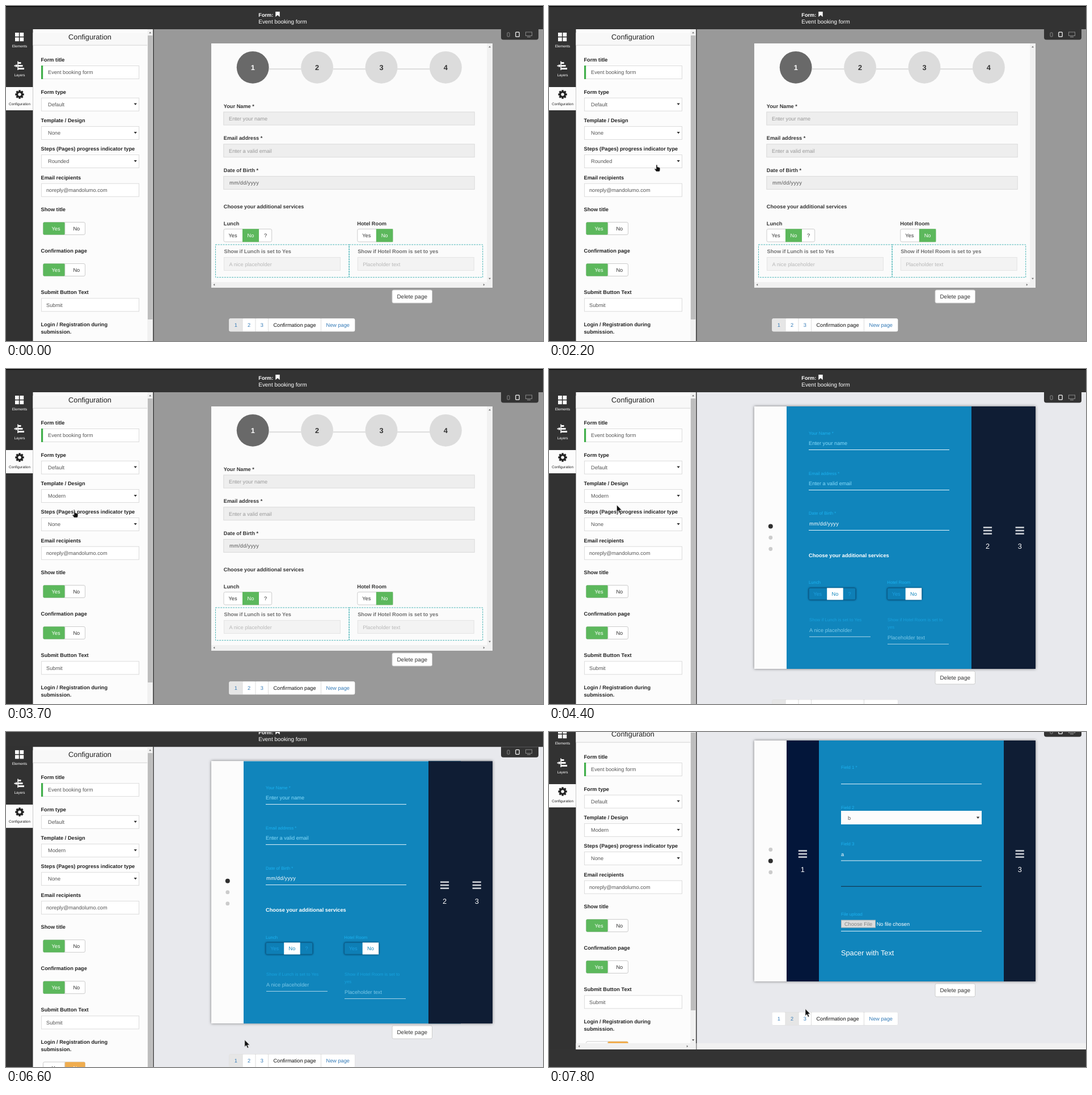
An HTML page for the animation above (8000 ms loop, 947 by 591 pixels).

```html
<!DOCTYPE html>
<html lang="en">
<head>
<meta charset="utf-8">
<title>Form builder</title>
<style>
  html, body { margin: 0; width: 100%; height: 100%; overflow: hidden; background: #333; }
  svg { display: block; }
  body > svg { width: 100vw; height: 100vh; }
  text { font-family: "Liberation Sans", Arial, sans-serif; text-rendering: geometricPrecision; }
  .card { filter: drop-shadow(0 0 2.5px rgba(0, 0, 0, .5)); }
  .glow { filter: drop-shadow(0 0 1.8px rgba(0, 20, 50, .75)); }
</style>
</head>
<body>
<svg id="stage" viewBox="0 0 947 591" xmlns="http://www.w3.org/2000/svg"></svg>
<script>
const LOOP = 8000, S = 9.21, M = 9.92, L = 12.76, XS = 6.38, FIELD = 7.75;
const BLUE = '#1085bc', NAVY = '#0f1d34', LINK = '#337ab7', CYAN = '#1cb2f0', PALE = '#86dcfb';

// Drawing helpers; text is placed by the middle of its capitals.
const rect = (x, y, w, h, fill, more = '') =>
  `<rect x="${x}" y="${y}" width="${w}" height="${h}" fill="${fill}" ${more}/>`;
const box = (x, y, w, h, fill = '#fff', stroke = '#dcdcdc', more = '') =>
  rect(x + .5, y + .5, w - 1, h - 1, fill, `stroke="${stroke}" ${more}`);
const text = (x, cy, str, size = S, fill = '#222', more = '') =>
  `<text x="${x}" y="${(cy + size * .36).toFixed(2)}" font-size="${size}" fill="${fill}" ${more}>${str}</text>`;
const bold = (x, cy, str, fill = '#222', size = S) => text(x, cy, str, size, fill, 'font-weight="700"');
const mid = (x, cy, str, size, fill, more = '') => text(x, cy, str, size, fill, `text-anchor="middle" ${more}`);
const path = (d, fill, more = '') => `<path d="${d}" fill="${fill}" ${more}/>`;
const group = (id, body, more = '') => `<g id="${id}" ${more}>${body}</g>`;
const tri = (x, y, angle, size = 2, fill = '#777') =>
  path('M-1 .6H1L0 -.7Z', fill, `transform="translate(${x} ${y}) rotate(${angle}) scale(${size})"`);
const date = (x, cy, fill) => text(x, cy, 'mm/dd/yyyy', S, fill, 'letter-spacing=".3"');
const rule = (x, y, w, fill = '#e9f6fc') => rect(x, y - .5, w, 1, fill);

// Panel widgets
const select = (y, value, id) => box(62, y, 173, 24) +
  text(74, y + 12, value, S, '#555', id ? `id="${id}"` : '') + tri(228.2, y + 11.5, 180, 2.7, '#333');
const input = (y, value, x = 71) => box(62, y, 173, 24) + text(x, y + 12, value, S, '#555');
const yesNo = (y, yes, no) => box(65, y, 75, 23, '#fff', '#ccc', 'rx="2.5"') +
  (yes ? rect(65.5, y + .5, 38.5, 22, yes, 'rx="2"') : rect(103.5, y + .5, 36, 22, no, 'rx="2"')) +
  rect(103.5, y, .8, 23, '#ccc') +
  mid(88, y + 11.5, 'Yes', S, yes ? '#fff' : '#333') + mid(124.3, y + 11.5, 'No', S, no ? '#fff' : '#333');

function sidebar() {
  const squares = [[16, 47], [24.4, 47], [16, 55.4], [24.4, 55.4]]
    .map(([x, y]) => rect(x, y, 6.8, 6.8, '#fff')).join('');
  const layers = rect(20.2, 97.5, 1.6, 15.5, '#fff') + path('M14.5 104.5h3v-2l3.4 3-3.4 3v-2h-3z', '#fff') +
    rect(21.5, 99, 5, 3, '#fff') + rect(21.5, 104, 8, 3, '#fff') + rect(21.5, 109, 10.5, 3, '#fff');
  let teeth = '';
  for (let a = 0; a < 360; a += 45) teeth += rect(22.3, 148.3, 3.4, 4, '#222', `transform="rotate(${a} 24 156)"`);
  return rect(0, 41, 47.5, 700, '#323232') + squares + mid(24, 71, 'Elements', XS, '#fff') +
    layers + mid(24, 122, 'Layers', XS, '#fff') + rect(0, 143, 47.5, 41, '#fcfcfc') + teeth +
    '<circle cx="24" cy="156" r="4.4" fill="none" stroke="#222" stroke-width="3.4"/>' +
    mid(24, 173, 'Configuration', XS, '#222');
}

function panel() {
  const labels = [[95, 'Form title'], [151.5, 'Form type'], [202, 'Template / Design'],
    [252, 'Steps (Pages) progress indicator type'], [302.5, 'Email recipients'], [359, 'Show title'],
    [432, 'Confirmation page'], [505, 'Submit Button Text'],
    [562, 'Login / Registration during'], [574.7, 'submission.']];
  return rect(47.5, 41, 212, 700, '#fcfcfc') + rect(47.5, 47, 202, 22, '#f8f8f8') + rect(47.5, 68.7, 202, 1, '#d4d4d4') +
    mid(148, 54.6, 'Configuration', L, '#222') +
    labels.map(([y, s]) => bold(61.5, y, s)).join('') +
    input(105, 'Event booking form', 74) + rect(62, 105, 3.2, 24, '#3fae49') +
    select(161.7, 'Default') + select(212, 'None', 'design') + select(262, 'Rounded', 'steps') +
    input(312.7, 'noreply@mandolumo.com') +
    yesNo(381, '#5cb85c') + yesNo(454, '#5cb85c') + input(515.3, 'Submit') + yesNo(596.5, '', '#f0ad4e') +
    rect(249.3, 41, 10, 700, '#f1f1f1') + tri(254.2, 47, 0) +
    '<rect id="thumb" x="250" y="52" width="8.4" fill="#bdbdbd"/>' +
    rect(259.3, 41, 1.3, 700, '#2b2b2b');
}

function header() {
  return rect(0, 0, 947, 41, '#333') + rect(0, 0, 947, 1.4, '#050505') + bold(445.3, 15.5, 'Form:', '#fff') +
    path('M475.3 10h7.4v9.3l-3.7-3.2-3.7 3.2z', '#fff') + text(445.3, 27.3, 'Event booking form', M, '#fff') +
    path('M873 41h66v14.500a4 4 0 0 1-4 4h-58a4 4 0 0 1-4-4z', '#333') +
    rect(884, 47, 4, 7, 'none', 'stroke="#888" rx=".8"') +
    rect(898.8, 46.2, 6.4, 8, 'none', 'stroke="#fff" stroke-width="1.2" rx="1"') +
    rect(916.5, 46, 11, 6.5, 'none', 'stroke="#888"') + rect(919, 54, 6, 1.2, '#888');
}

function classicForm() {
  let s = rect(362, 66, 496, 431, '#fbfbfb') + rect(848, 66, 10, 421, '#f1f1f1') + rect(362, 487, 496, 10, '#f1f1f1') +
    tri(853, 72, 0) + tri(853, 481, 180) + tri(367, 491.7, -90) + tri(843, 491.7, 90);
  for (let i = 0; i < 4; i++) {
    const x = 435.2 + i * 113.4;
    if (i < 3) s += rect(x + 28, 110.2, 58, 2, '#dcdcdc');
    s += `<circle cx="${x}" cy="108.3" r="28.4" fill="${i ? '#dcdcdc' : '#696969'}"/>` +
      mid(x, 108.3, i + 1, L, i ? '#333' : '#fff', 'font-weight="700"');
  }
  ['Your Name *', 'Email address *', 'Date of Birth *'].forEach((name, i) => {
    const y = 176.2 + i * 56.7;
    s += bold(383.8, y, name, '#333') + box(383.3, y + 10.3, 443.4, 24, '#eee', '#dadada') +
      (i < 2 ? text(393, y + 22.5, ['Enter your name', 'Enter a valid email'][i], S, '#999') : date(394, y + 22.5, '#555'));
  });
  const toggle = (x, w, cut, end) => box(x, 393, w, 23.5, '#fff', '#ccc', 'rx="2.500"') +
    rect(x + cut, 393.3, end - cut, 23, '#5cb85c') + mid(x + 16.5, 404.7, 'Yes', S, '#333') +
    mid(x + (cut + end) / 2, 404.7, 'No', S, '#fff');
  s += bold(383.8, 353.3, 'Choose your additional services', '#333') +
    bold(383.8, 383.2, 'Lunch', '#333') + toggle(383.5, 85.7, 33.5, 62.5) + mid(457.5, 404.7, '?', S, '#333') +
    bold(619.3, 383.2, 'Hotel Room', '#333') + toggle(619.3, 63.2, 33.5, 63);
  [['Show if Lunch is set to Yes', 'A nice placeholder'], ['Show if Hotel Room is set to yes', 'Placeholder text']]
    .forEach(([name, hint], i) => {
      const x = 369.5 + i * 235.7;
      s += rect(x, 421, 235.5, 57.7, 'none', 'stroke="#45b3b5" stroke-dasharray="2.8 1.6"') +
        bold(x + 15, 433, name, '#707070') + box(x + 14.5, 443, 206, 24, '#f3f3f3', '#e4e4e4') +
        text(x + 24, 455.3, hint, S, '#b8b8b8');
    });
  return s;
}

const label = (x, y, s) => text(x, y, s, FIELD, CYAN);

// Both pages are drawn relative to their own left edge.
function pageOne() {
  const toggle = (x, w, end) => box(x, 386, w, 21.5, '#0e7fb6', '#0b6390', 'rx="2" class="glow"') +
    rect(x + 32.5, 386.3, end - 32.5, 21, '#fff') + mid(x + 16, 396.7, 'Yes', S, '#1da0e0') +
    mid(x + 16.2 + end / 2, 396.7, 'No', S, BLUE);
  const faded = label(40, 442.3, 'Show if Lunch is set to Yes') + text(40, 460.8, 'A nice placeholder', S, '#b5ecff') +
    rule(40, 472.3, 108, '#fff') + label(178, 442.3, 'Show if Hotel Room is set to') + label(178, 455, 'yes') +
    text(178, 473.4, 'Placeholder text', S, '#b5ecff') + rule(178, 485.3, 108, '#fff');
  return label(39, 113, 'Your Name *') + text(39, 131, 'Enter your name', S, PALE) + rule(39, 142.5, 248) +
    label(39, 184, 'Email address *') + text(39, 202, 'Enter a valid email', S, PALE) + rule(39, 213.5, 248) +
    label(39, 254.7, 'Date of Birth *') + date(40, 273, '#fff') + rule(39, 284.5, 248) +
    bold(39, 328.7, 'Choose your additional services', '#fff') +
    label(39, 376.7, 'Lunch') + toggle(38.7, 83.5, 61) + mid(111, 396.7, '?', S, '#1da0e0') +
    label(177.3, 376.7, 'Hotel Room') + toggle(177.2, 61.5, 61) + `<g opacity=".65">${faded}</g>`;
}

function pageTwo() {
  return label(39, 113, 'Field 1 *') + rule(39, 142.7, 248) + label(39, 184, 'Field 2') +
    rect(39, 190, 248, 24, '#fcfcfc') + text(51, 202.3, 'b', S, '#555') + tri(280.5, 202, 180, 2.7, '#333') +
    label(39, 248.3, 'Field 3') + text(39, 266.3, 'a', S, '#fff') + rule(39, 278, 248) + rule(39, 323.3, 248, '#12293c') +
    label(39, 372.3, 'File upload') + box(39, 382.5, 61, 14, '#dcdcdc', '#b5b5b5') + mid(69.5, 389.5, 'Choose File', S, '#858585') +
    text(101.7, 389.5, 'No file chosen', S, '#fff') + rule(39, 402.3, 248) + text(39, 440.3, 'Spacer with Text', L, '#fff');
}

const strip = (id, n) => group(id, [-5.5, 0, 5.5].map(d => rect(-7.6, d - 13.7, 15.2, 2.6, '#ccd0d6')).join('') +
  mid(0, 15.3, n, L, '#fff'));
const pane = (id, tint, body) => `<svg id="${id}" y="66" height="600">${rect(0, 0, 340, 600, BLUE)}` +
  group(id + 'Shade', rect(0, 0, 340, 600, tint)) + group(id + 'Body', body, 'transform="translate(0 -66)"') + '</svg>';

function modernForm() {
  return '<rect id="card" class="card" x="362" y="66" width="496" fill="#fcfcfc"/>' +
    '<clipPath id="clip"><rect id="clipBox" x="362" y="66" width="496"/></clipPath>' +
    `<g clip-path="url(#clip)">${rect(745, 66, 113, 600, NAVY)}` +
    pane('one', '#03163a', pageOne()) + pane('two', NAVY, pageTwo()) +
    strip('s1', 1) + strip('s2', 2) + strip('s3', 3) + '</g>' +
    [0, 1, 2].map(i => `<circle id="dot${i}" cx="390.8"/>`).join('');
}

function footer() {
  const cells = [[393.5, 23.5, '1'], [417, 23, '2'], [440, 22.5, '3'], [462.5, 93, 'Confirmation page'], [555.5, 59.5, 'New page']];
  return box(680.5, 3.5, 71.5, 24, '#fff', '#ccc', 'rx="2.5"') + mid(716.2, 15.5, 'Delete page', M, '#333') +
    box(393, 54, 222.5, 23.5, '#fff', '#ddd', 'rx="2.5"') +
    cells.map(([x, w, s], i) => rect(x, 54.5, w, 22.5, '#fff', `id="cell${i}" rx="2"`) +
      (i ? rect(x - .5, 54.5, 1, 22.5, '#ddd') : '') +
      mid(x + w / 2, 65.7, s, S, i === 3 ? '#111' : LINK, `id="name${i}"`)).join('');
}

const popup = box(62, 235, 173, 31.5, '#fff', '#a9a9a9') + rect(62.5, 236, 172, 15, '#1e90ff', 'id="pick"') +
  text(74, 243.5, 'None', S, '#fff', 'id="opt0"') + text(74, 258.5, 'Modern', S, '#333', 'id="opt1"');

const bars = rect(47.5, -11, 212, 11, '#f1f1f1') + tri(53, -5.5, -90) + tri(244, -5.5, 90) + tri(254.2, -16.5, 180, 2, '#444') +
  rect(260.6, -11, 687, 11, '#f1f1f1') + rect(0, 0, 947, 300, '#333');

document.getElementById('stage').innerHTML = group('doc',
  '<rect id="back" x="260" y="41" width="687" height="700"/>' + sidebar() + panel() +
  group('classic', classicForm()) + group('modern', modernForm()) + group('foot', footer()) +
  group('bars', bars) + header() + group('popup', popup)) +
  group('cursor',
    path('M0 0V12.300L2.800 9.600 4.800 14.300 6.900 13.400 4.900 8.900H8.800Z', '#111', 'id="arrow" stroke="#eee" stroke-width=".6"') +
    path('M-1 0.500Q0 -.6 1 .5V3.800L5 4.900 5.800 6V9.500L4.800 12H-.8L-4 7.800-3 6.700-1 8Z', '#111', 'id="hand" stroke="#eee" stroke-width=".5"'));

const $ = id => document.getElementById(id);
const set = (id, attrs) => { for (const k in attrs) $(id).setAttribute(k, attrs[k]); };
const show = (id, on) => set(id, { display: on ? 'inline' : 'none' });
const ramp = (t, a, b) => Math.min(1, Math.max(0, (t - a) / (b - a)));
const ease = p => p * p * (3 - 2 * p);
const mix = (a, b, p) => a + (b - a) * p;

// Pointer path: time, x, y
const route = [[200, 936, 572], [500, 690, 470], [800, 320, 345], [1000, 193, 300], [1500, 291, 349], [1700, 291, 349],
  [1900, 302, 496], [2200, 190, 280], [2600, 121, 223], [2900, 121, 223], [3200, 121, 250], [3900, 121, 250],
  [4000, 119.5, 240], [4500, 119.5, 240], [4800, 290, 325], [5100, 531, 500], [5400, 434, 577],
  [5800, 416.5, 548.5], [6200, 416.5, 548.5], [6300, 419, 549], [6400, 419, 549], [7100, 428.5, 520],
  [7400, 428.5, 520], [7800, 452, 488.5]];

function pointer(t) {
  const i = route.findIndex(k => k[0] > t);
  if (i < 0) return route[route.length - 1].slice(1);
  const a = route[Math.max(0, i - 1)], b = route[i], p = ease(ramp(t, a[0], b[0]));
  return [mix(a[1], b[1], p), mix(a[2], b[2], p)];
}

function draw(ms) {
  const t = Math.floor(ms / 100) * 100;
  const modern = t >= 3800, k = ease(ramp(t, 7400, 7700));
  const bottom = modern ? mix(529, 491, k) : 497;
  const scroll = mix(75 * ease(ramp(t, 6400, 7100)), 51, k);

  set('doc', { transform: `translate(0 ${-scroll})` });
  set('back', { fill: modern ? '#e8e9ed' : '#999' });
  set('thumb', { height: (modern ? mix(614, 542, k) : 553) - 52 });
  set('foot', { transform: `translate(0 ${bottom})` });
  set('bars', { transform: `translate(0 ${bottom + 120})` });
  $('design').textContent = t >= 3700 ? 'Modern' : 'None';
  $('steps').textContent = t >= 3700 ? 'None' : 'Rounded';

  show('popup', t >= 2800 && t < 3600);
  const second = t >= 3200;
  set('pick', { y: second ? 251 : 236 });
  set('opt0', { fill: second ? '#333' : '#fff' });
  set('opt1', { fill: second ? '#fff' : '#333' });

  show('classic', t < 4000);
  show('modern', modern);
  set('modern', { opacity: ramp(t, 3700, 4000) });
  const split = mix(745, 476, k), middle = (66 + bottom) / 2;
  for (const id of ['card', 'clipBox']) set(id, { height: bottom - 66 });
  set('one', { x: 419, width: split - 419 });
  set('two', { x: split, width: 802 - split });
  set('oneShade', { opacity: k });
  set('oneBody', { opacity: 1 - k });
  set('twoShade', { opacity: 1 - k });
  set('twoBody', { opacity: k });
  set('s1', { transform: `translate(447.4 ${middle})`, opacity: k });
  set('s2', { transform: `translate(${split + 28.5} ${middle})`, opacity: 1 - k });
  set('s3', { transform: `translate(830.2 ${middle})` });

  const page = t >= 7400 ? 1 : 0, hover = t >= 7100 && !page;
  for (let i = 0; i < 3; i++) {
    set('dot' + i, { cy: middle + (i - 1) * 20, r: i === page ? 4 : 3.4, fill: i === page ? '#2f2f2f' : '#ccc' });
    set('cell' + i, { fill: i === page ? '#e6e6e6' : hover && i === 1 ? '#eee' : '#fff' });
  }
  set('name1', { fill: hover ? '#23527c' : LINK });

  const [x, y] = pointer(t), hand = x < 250 && t < 4000;
  show('cursor', t >= 200 && (t < 4000 || t >= 4400));
  set('cursor', { transform: `translate(${x} ${y})` });
  show('hand', hand);
  show('arrow', !hand);
}

const start = performance.now();
function tick() {
  draw((performance.now() - start) % LOOP);
  requestAnimationFrame(tick);
}
tick();
</script>
</body>
</html>
```
